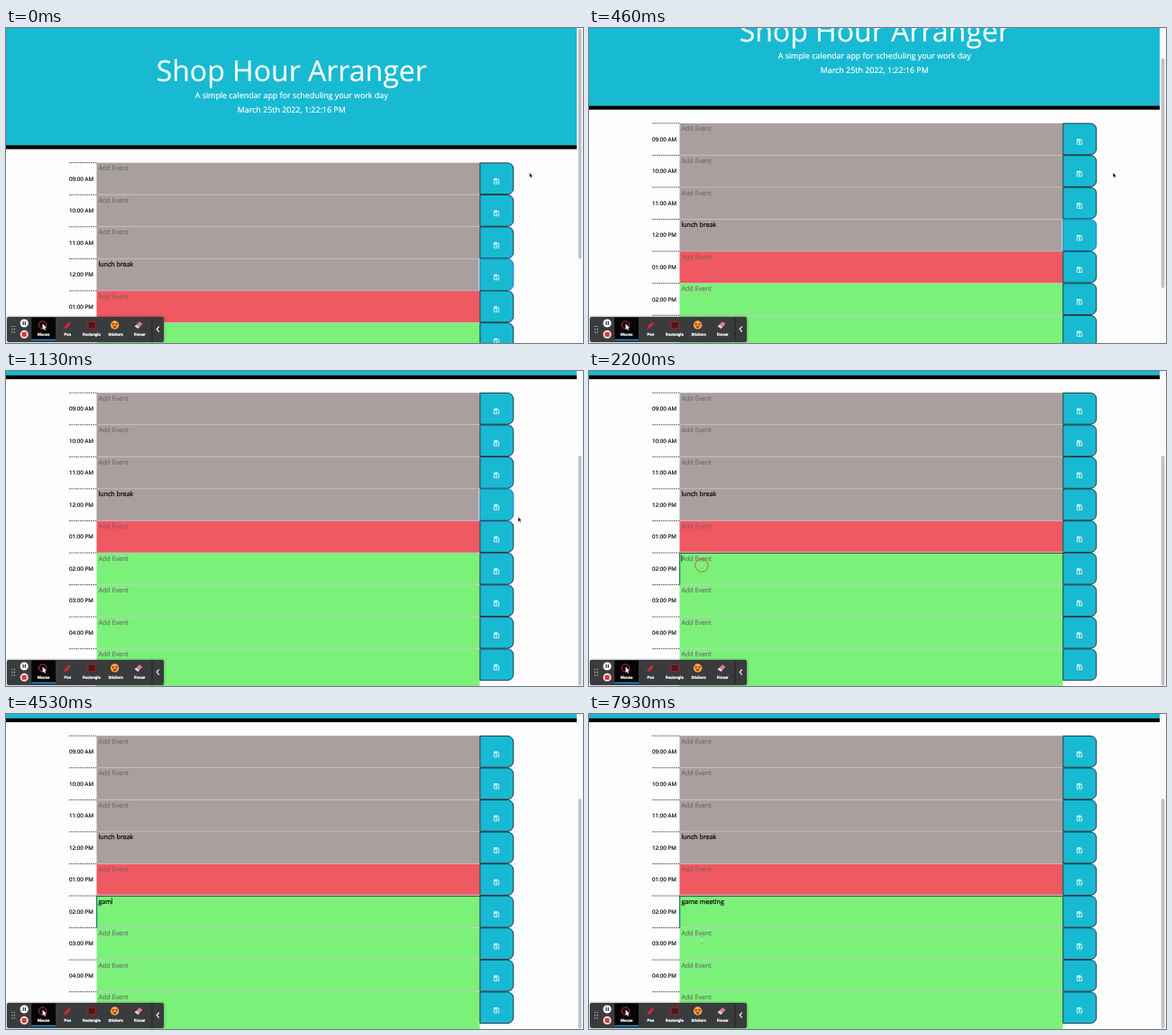
These frames come from a looping animation (640x350 px, 8 s). An HTML page with a canvas:

```html
<!DOCTYPE html>
<html lang="en">
<head>
<meta charset="utf-8">
<title>Day planner</title>
<style>
html, body { margin: 0; width: 100%; height: 100%; overflow: hidden; background: #fff; }
canvas { display: block; width: 640px; height: 350px; }
</style>
</head>
<body>
<canvas id="stage" width="640" height="350"></canvas>
<script>
const ctx = document.getElementById('stage').getContext('2d');
ctx.textRendering = 'geometricPrecision';
const LOOP = 8000;
const PAGE_WIDTH = 633;
const MAX_SCROLL = 125.5;
const FIRST_ROW = 149.7;
const PITCH = 35.56;
const FOCUS_ROW = 5;
const CLICK = 2130;
const BLINK = 500;
const CYAN = '#17bad2';
const SANS = '"Open Sans", sans-serif';
const HOURS = ['09:00 AM', '10:00 AM', '11:00 AM', '12:00 PM', '01:00 PM',
  '02:00 PM', '03:00 PM', '04:00 PM', '05:00 PM'];
const MESSAGE = 'game meeting';
const KEY_TIMES = [4000, 4260, 4460, 4740, 4990, 5260, 5490, 5680, 5860, 5990, 6120, 6230];

const ease = (t, from, to) => {
  const x = Math.min(1, Math.max(0, (t - from) / (to - from)));
  return x * x * (3 - 2 * x);
};
const mix = (a, b, k) => a + (b - a) * k;

function rect(x, y, w, h, color) {
  ctx.fillStyle = color;
  ctx.fillRect(x, y, w, h);
}

function roundBox(x, y, w, h, radius, fill, stroke, width = 1) {
  ctx.beginPath();
  ctx.roundRect(x, y, w, h, radius);
  paint(fill, stroke, width);
}

function circle(x, y, r, fill, stroke, width = 1) {
  ctx.beginPath();
  ctx.arc(x, y, r, 0, Math.PI * 2);
  paint(fill, stroke, width);
}

function path(points, fill, stroke, width = 1, closed = true) {
  ctx.beginPath();
  points.forEach(([x, y]) => ctx.lineTo(x, y));
  if (closed) ctx.closePath();
  paint(fill, stroke, width);
}

function paint(fill, stroke, width) {
  if (fill) { ctx.fillStyle = fill; ctx.fill(); }
  if (stroke) { ctx.strokeStyle = stroke; ctx.lineWidth = width; ctx.stroke(); }
}

// A hairline outline gives small text the weight of a scaled-down screen.
function text(str, x, y, size, color, align = 'left', family = SANS, weight = 400) {
  ctx.font = `${weight} ${size}px ${family}`;
  ctx.textAlign = align;
  ctx.fillStyle = ctx.strokeStyle = color;
  ctx.lineWidth = 0.2;
  ctx.lineJoin = 'round';
  ctx.fillText(str, x, y);
  ctx.strokeText(str, x, y);
  ctx.lineJoin = 'miter';
}

function drawHeader(top) {
  rect(0, top, PAGE_WIDTH, 130.2, CYAN);
  rect(0, top + 130.2, PAGE_WIDTH, 4.4, '#000');
  text('Shop Hour Arranger', 316.7, top + 59.2, 32, '#fff', 'center');
  text('A simple calendar app for scheduling your work day', 316.7, top + 77.6, 8.89, '#fff', 'center');
  text('March 25th 2022, 1:22:16 PM', 316.7, top + 93.6, 8.89, '#fff', 'center');
}

function drawSaveButton(y, focused) {
  roundBox(525.8, y + 0.2, 37, 34.8, [0, 6.6, 6.6, 0], CYAN, focused ? '#1769c8' : '#16262b', 0.9);
  if (focused) rect(524.2, y, 1, 35, '#d8d4d8');
  const x = 541.3, top = y + 17.8;
  path([[x, top], [x + 4, top], [x + 5.4, top + 1.4], [x + 5.4, top + 5.6], [x, top + 5.6]],
    null, '#f4fdff', 0.8);
  ctx.strokeRect(x + 1.2, top + 0.3, 2.4, 1.4);
  circle(x + 2.7, top + 3.6, 0.9, '#f4fdff');
}

function drawEntry(i, y, t) {
  const typed = KEY_TIMES.filter(k => k <= t).length;
  const value = i === 3 ? 'lunch break' : i === FOCUS_ROW ? MESSAGE.slice(0, typed) : '';
  const hint = i === 4 ? 'rgba(117,90,95,.65)' : 'rgba(110,110,110,.9)';
  text(value || 'Add Event', 102.4, y + 8.6, 7.11, value ? '#000' : hint);

  if (i !== FOCUS_ROW || t < CLICK) return;
  rect(100.5, y - 1.2, 425, 0.9, '#f0e4ea');
  rect(100.5, y - 0.2, 425, 0.9, '#12301a');
  rect(100.2, y, 1, PITCH, '#0c5a60');
  const lastAction = typed ? KEY_TIMES[typed - 1] : CLICK;
  if (Math.floor((t - lastAction) / BLINK) % 2 === 0) {
    const caretX = 102.5 + (value ? ctx.measureText(value).width : 0);
    rect(caretX, y + 2.3, 0.7, 7.4, '#000');
  }
}

function drawRows(top, t) {
  HOURS.forEach((hour, i) => {
    const y = top + FIRST_ROW + i * PITCH;
    const color = i < 4 ? '#a99f9e' : i === 4 ? '#ef5961' : '#7bf17a';
    rect(100.5, y, 425, PITCH + (i === 8 ? 7 : 0), color);
    if (i) rect(100.5, y - 0.6, 425, 0.9, 'rgba(200,192,204,.75)');
  });
  HOURS.forEach((hour, i) => {
    const y = top + FIRST_ROW + i * PITCH;
    ctx.setLineDash([1.5, 0.9]);
    path([[70, y], [100.4, y]], null, '#222', 0.8, false);
    ctx.setLineDash([]);
    text(hour, 70, y + 19.9, 6.22, '#111');
    drawEntry(i, y, t);
    drawSaveButton(y, i === 3 && t < CLICK);
  });
}

function drawScrollbar(scroll) {
  rect(PAGE_WIDTH, 0, 640 - PAGE_WIDTH, 350, '#fafafa');
  roundBox(634.8, 1 + scroll * 0.742, 3.6, 255.5, 1.8, '#c1c1c1');
}

function drawPointer(t) {
  const hidden = t >= KEY_TIMES[0] && t < 7000;
  const travel = ease(t, 1050, 1850);
  const x = mix(mix(580.8, 581.4, ease(t, 60, 300)), 125, travel);
  const y = mix(mix(161, 215.5, travel), 251, ease(t, 7000, 7700));

  if (t >= 2100 && t < 2480) circle(125, 216, 7.2, null, '#c4622f', 0.9);
  if (hidden) return;
  if (x > 101 && x < 525) {
    rect(x - 0.4, y - 3.4, 0.8, 6.8, 'rgba(215,235,215,.8)');
    rect(x - 1.6, y - 3.8, 3.2, 0.7, 'rgba(110,150,110,.7)');
    rect(x - 1.6, y + 3.1, 3.2, 0.7, 'rgba(110,150,110,.7)');
  } else {
    path([[x, y], [x, y + 4.6], [x + 1, y + 3.8], [x + 1.8, y + 5.5],
      [x + 2.5, y + 5.2], [x + 1.8, y + 3.5], [x + 3.2, y + 3.4]], '#000');
  }
}

function drawToolIcons() {
  circle(40.6, 330, 4.2, null, '#d8343c', 0.9);
  path([[40.6, 328.6], [40.6, 335], [42, 333.8], [43, 335.9], [44, 335.4],
    [43.1, 333.4], [45, 333.2]], '#fff');

  path([[64.6, 334.2], [65.3, 331.2], [69.6, 326.4], [72, 328.5], [67.6, 333.3]], '#e3262e');
  path([[68.4, 327.8], [70.7, 329.9]], null, '#3a3b3d', 0.6, false);

  roundBox(91, 326.3, 8.4, 7.6, 0.5, '#421c20', '#c31822', 1);

  circle(120.6, 330, 4.7, '#f8b43c');
  circle(118.7, 329.1, 1.6, '#d8433c');
  circle(122.6, 329.1, 1.6, '#d8433c');
  ctx.beginPath();
  ctx.arc(120.6, 331.3, 2.1, 0, Math.PI);
  paint('#7a4218');

  path([[142.7, 331.5], [147.9, 326.3], [151.5, 328.7], [146.5, 334]], '#d9808c');
  path([[142.7, 331.5], [144.4, 329.8], [148.1, 332.3], [146.5, 334]], '#efd0d4');
}

function drawToolbar() {
  ctx.save();
  ctx.shadowColor = 'rgba(0,0,0,.45)';
  ctx.shadowBlur = 3;
  roundBox(1, 321, 174, 28, 2, '#3a3b3d');
  ctx.restore();

  for (let i = 0; i < 6; i++) circle(6.8 + (i % 2) * 2.6, 331.6 + (i >> 1) * 3.2, 0.7, '#c9c9c9');

  circle(20.2, 328, 4.6, '#fff');
  rect(18.6, 326, 1.1, 4, '#222');
  rect(20.8, 326, 1.1, 4, '#222');
  circle(20.2, 340.4, 4.6, '#f4dcdd');
  roundBox(17.7, 337.9, 5, 5, 0.8, '#e2353d');

  rect(28.3, 321.6, 26.7, 26, '#050505');
  rect(28.3, 345.8, 26.7, 1.5, '#2492dd');
  drawToolIcons();
  ['Mouse', 'Pen', 'Rectangle', 'Stickers', 'Eraser'].forEach((name, i) =>
    text(name, 41.6 + i * 26.7, 341.8, 4.4, '#fff', 'center', 'Roboto, sans-serif', 700));

  rect(161.6, 321.5, 0.8, 27, '#1d1e20');
  path([[169.8, 331.6], [167.2, 334.6], [169.8, 337.6]], null, '#fff', 1.1, false);
}

function draw(now) {
  const t = now % LOOP;
  const scroll = MAX_SCROLL * ease(t, 138, 949);
  rect(0, 0, 640, 350, '#fefefe');
  drawHeader(-scroll);
  drawRows(-scroll, t);
  drawScrollbar(scroll);
  drawPointer(t);
  drawToolbar();
  requestAnimationFrame(draw);
}

requestAnimationFrame(draw);
</script>
</body>
</html>
```
